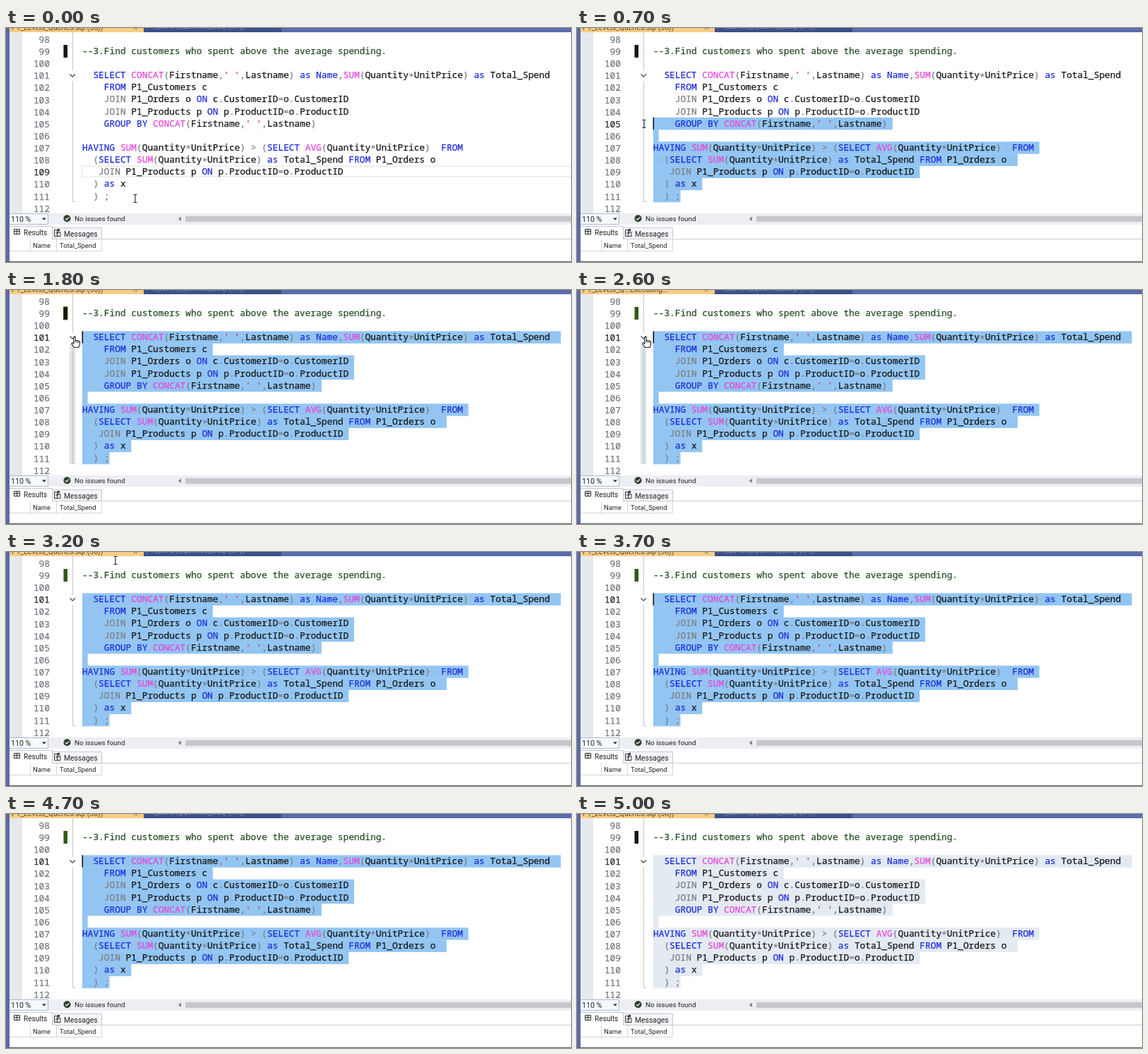
Recreate the animation shown at these times as an HTML page. Size 800 by 332 pixels, loop 5.1 s.

```html
<!DOCTYPE html>
<html lang="en">
<head>
<meta charset="utf-8">
<title>Query editor</title>
<style>
  html, body { margin: 0; width: 100%; height: 100%; overflow: hidden; background: #fff; }
  svg { display: block; width: 800px; height: 332px; }
  text { white-space: pre; }
  .code text { font: 500 12.83px "Noto Sans Mono", "DejaVu Sans Mono", monospace; stroke-width: .25px; }
  .ui text { font-family: Roboto, "Liberation Sans", sans-serif; }
</style>
</head>
<body>
<svg id="stage" viewBox="0 0 800 332"></svg>
<script>
const NS = "http://www.w3.org/2000/svg";
const LOOP = 5100, STEP = 100;
const LEFT = 108, CHAR = 7.7, TOP = 7, ROW = 17.14, FIRST = 98;
const stage = document.getElementById("stage");

const lines = [
  "",
  "--3.Find customers who spent above the average spending.",
  "",
  "  SELECT CONCAT(Firstname,' ',Lastname) as Name,SUM(Quantity*UnitPrice) as Total_Spend ",
  "    FROM P1_Customers c",
  "    JOIN P1_Orders o ON c.CustomerID=o.CustomerID",
  "    JOIN P1_Products p ON p.ProductID=o.ProductID",
  "    GROUP BY CONCAT(Firstname,' ',Lastname)",
  "",
  "HAVING SUM(Quantity*UnitPrice) > (SELECT AVG(Quantity*UnitPrice)  FROM",
  "  (SELECT SUM(Quantity*UnitPrice) as Total_Spend FROM P1_Orders o ",
  "   JOIN P1_Products p ON p.ProductID=o.ProductID",
  "  ) as x",
  "  ) ;",
  ""
];

function add(parent, tag, attrs, content) {
  const el = document.createElementNS(NS, tag);
  for (const k in attrs) el.setAttribute(k, attrs[k]);
  if (content) el.textContent = content;
  parent.appendChild(el);
  return el;
}
const group = cls => add(stage, "g", { class: cls });
const rect = (p, x, y, width, height, fill) => add(p, "rect", { x, y, width, height, fill });
const path = (p, d, stroke, width = 1, fill = "none") =>
  add(p, "path", { d, stroke, "stroke-width": width, fill });
const label = (p, x, y, size, str, fill = "#222") =>
  add(p, "text", { x, y, "font-size": size, fill }, str);
const set = (el, attrs) => { for (const k in attrs) el.setAttribute(k, attrs[k]); };
const show = (el, on) => el.setAttribute("visibility", on ? "visible" : "hidden");

function tokenColor(tok) {
  if (/^--/.test(tok)) return "#264f26";
  if (/^'/.test(tok)) return "#cc4040";
  if (/^(CONCAT|SUM|AVG)$/.test(tok)) return "#e846d8";
  if (/^(SELECT|FROM|GROUP|BY|HAVING|ON|as|Name)$/.test(tok)) return "#1e2cdc";
  if (/^(JOIN|\W)/.test(tok)) return "#7c7e80";
  return "#161616";
}

// Window frame and tabs
const frame = group("ui");
rect(frame, 0, 0, 800, 332, "#ffffff");
rect(frame, 0, 0, 800, 6, "#5a6cab");
rect(frame, 195, 0, 195, 6, "#3c5088");
rect(frame, 5, 0, 190, 6, "#f6cd84");
rect(frame, 5, 6, 18, 257, "#e8e9ec");
rect(frame, 0, 0, 5, 332, "#5a6ba8");
const tabTitle = label(frame, 8, 2.5, 10.5, "", "#5a4628");
label(frame, 198, 1, 10.5, "P1_Levels_Queries_2.sql (54))", "#8492bb");
path(frame, "M181 -3l5 5m0 -5l-5 5", "#7a6236");

// Code area
const lineBox = add(stage, "rect", {
  x: 107.5, width: 700, height: 15, fill: "none", stroke: "#e6e6ee", "stroke-width": 1.3
});
const selection = group("");
const selRows = lines.map((_, i) => rect(selection, LEFT, TOP + i * ROW, 0, ROW + .3, "none"));
const foldHover = rect(stage, 90, 76, 8, 171, "#dfe3e8");
path(stage, "M94.500 6V61M94.500 75V246.500H98.500", "#c2c4c8");
path(stage, "M90.500 65.500l3.700 3.700 3.700 -3.700", "#444", 1.3);
const changeBar = rect(stage, 81.5, 24, 5.5, 18, "#111");

const code = group("code");
const numbers = lines.map((_, i) => add(code, "text", {
  x: 62, y: 20.8 + i * ROW, "text-anchor": "end"
}, String(FIRST + i)));
lines.forEach((line, i) => {
  for (const m of line.matchAll(/--.*|'[^']*'|\w+|[^\s\w]/g)) {
    const c = tokenColor(m[0]);
    const drop = m[0] === "*" ? 2.4 : 0;
    add(code, "text", { x: LEFT + m.index * CHAR, y: 19.7 + i * ROW + drop, fill: c, stroke: c }, m[0]);
  }
});
const caret = rect(stage, LEFT - .5, 0, 1.6, ROW, "#111");

// Status bar and results pane
const pane = group("ui");
rect(pane, 5, 263, 795, 16, "#eceef4");
rect(pane, 5, 279, 795, 53, "#ffffff");
rect(pane, 5, 264, 54.5, 14, "#f6f9fd");
path(pane, "M5 263.500H59.500V278.500H5", "#a9b8d6");
label(pane, 7, 274.8, 10.6, "110 %");
path(pane, "M51 269.500h6l-3 3.200z", "none", 0, "#333");
add(pane, "circle", { cx: 86.5, cy: 270.2, r: 5, fill: "#2b402c" });
path(pane, "M84 270.200l1.900 1.900 3.300 -3.700", "#fff", 1.2);
label(pane, 97, 274, 9.9, "No issues found");
path(pane, "M248 267.500v6.500l-4.500 -3.250z", "none", 0, "#85878c");
rect(pane, 254, 267, 546, 8, "#c6c7cb");
rect(pane, 66, 284, 69, 15, "#f5f6fa");
path(pane, "M5 281.500H65.500V299M65 283.500H135.500V299", "#c3c7d0");
path(pane, "M65 299.500H800", "#c9ccd4");
path(pane, "M11.500 285.500h8v7h-8zM11.500 288.500h8M15.500 285.500v7", "#333");
label(pane, 25, 294, 10.1, "Results");
path(pane, "M68.500 286.500h4v9h-4zM72 289.500h5v6h-5M70 291h5", "#333");
rect(pane, 73, 285, 3, 3, "#333");
label(pane, 82, 295.5, 10.4, "Messages");
path(pane, "M5 316.500H135.500M34.500 300V316M71.500 300V316M135.500 300V316", "#d3d5da");
label(pane, 38, 311.7, 9.4, "Name");
label(pane, 76, 311.7, 9.4, "Total_Spend");
rect(pane, 0, 331, 800, 1, "#56625e");

// Pointers, drawn around their hot spot
const beam = group("");
path(beam, "M-2.500 -5.500h2l.5 .5 .5 -.5h2M0 -5V5M-2.500 5.500h2l.5 -.5 .5 .5h2", "#222", 1.1);
const hand = group("");
path(hand, "M-1.200 1Q0 -.8 1.200 1V6Q2.500 4.800 3.500 6.200 4.800 5.200 5.700 6.700 7.500 6 7.500 8" +
  "V11.500L6 15.500H-.500L-4 10.500Q-4.500 8.300 -2.500 9L-1.200 10.200Z", "#222", 1.1, "#fff");
path(hand, "M1.200 6v3M3.500 6.500v2.700M5.700 7v2.300", "#222", .8);

// Pointer path: time, x, y
const track = [
  [0, 183, 242], [200, 160, 241], [700, 95, 136], [1100, 97, 66],
  [3000, 97, 66], [3200, 155, 12], [3300, 172, -12]
];
function pointerAt(t) {
  for (let i = 1; i < track.length; i++) {
    const [t0, x0, y0] = track[i - 1], [t1, x1, y1] = track[i];
    if (t <= t1) {
      const k = (t - t0) / (t1 - t0);
      return [x0 + (x1 - x0) * k, y0 + (y1 - y0) * k];
    }
  }
  return [172, -20];
}

const ANCHOR = 13, PRESS = 200, RELEASE = 1100, BLUR = 4900;

function drawSelection(t, row, col) {
  const color = t >= BLUR ? "#e3eaf2" : "#93c5f2";
  selRows.forEach((el, i) => {
    const from = i === row ? col : 0;
    const to = lines[i].length + (i < ANCHOR ? 1 : 0);
    const on = t >= PRESS && i >= row && i <= ANCHOR;
    set(el, { x: LEFT + from * CHAR, width: on ? Math.max(0, to - from) * CHAR : 0, fill: color });
  });
}

function draw(t) {
  const [px, py] = pointerAt(t);
  const [hx, hy] = pointerAt(Math.min(t, RELEASE));
  const clicked = t >= PRESS;
  const row = clicked ? Math.max(3, Math.min(ANCHOR, Math.floor((hy - TOP) / ROW))) : 11;
  const col = Math.max(0, Math.min(lines[row].length, Math.round((hx - LEFT) / CHAR)));
  drawSelection(t, row, col);

  show(lineBox, t <= PRESS);
  set(lineBox, { y: TOP + row * ROW + .5 });
  numbers.forEach((el, i) => {
    const c = i === row ? "#2b2b2b" : "#74797f";
    set(el, { fill: c, stroke: c, "stroke-width": i === row ? .5 : .25 });
  });

  const blinkOn = t < 1500 || (t - 1500) % 1060 < 530;
  show(caret, clicked && t < BLUR && blinkOn);
  set(caret, { x: LEFT - .5 + col * CHAR, y: TOP + row * ROW });

  const overFold = t >= RELEASE && t <= 3000;
  show(hand, overFold);
  show(foldHover, overFold);
  show(beam, !overFold && py > 0);
  for (const el of [hand, beam]) set(el, { transform: `translate(${px} ${py})` });

  const running = t >= 2500 && t < 2900;
  tabTitle.textContent = running ? "P1_Levels_Q...Executing..." : "P1_Levels_Queries.sql (56))";
  set(changeBar, {
    fill: t >= 2500 && t < BLUR ? "#2f5a14" : "#121510",
    stroke: t >= 1300 && t < 2500 ? "#2f5a14" : "none"
  });
}

function tick() {
  const t = performance.now() % LOOP;
  draw(Math.floor(t / STEP) * STEP);
  requestAnimationFrame(tick);
}
tick();
</script>
</body>
</html>
```
